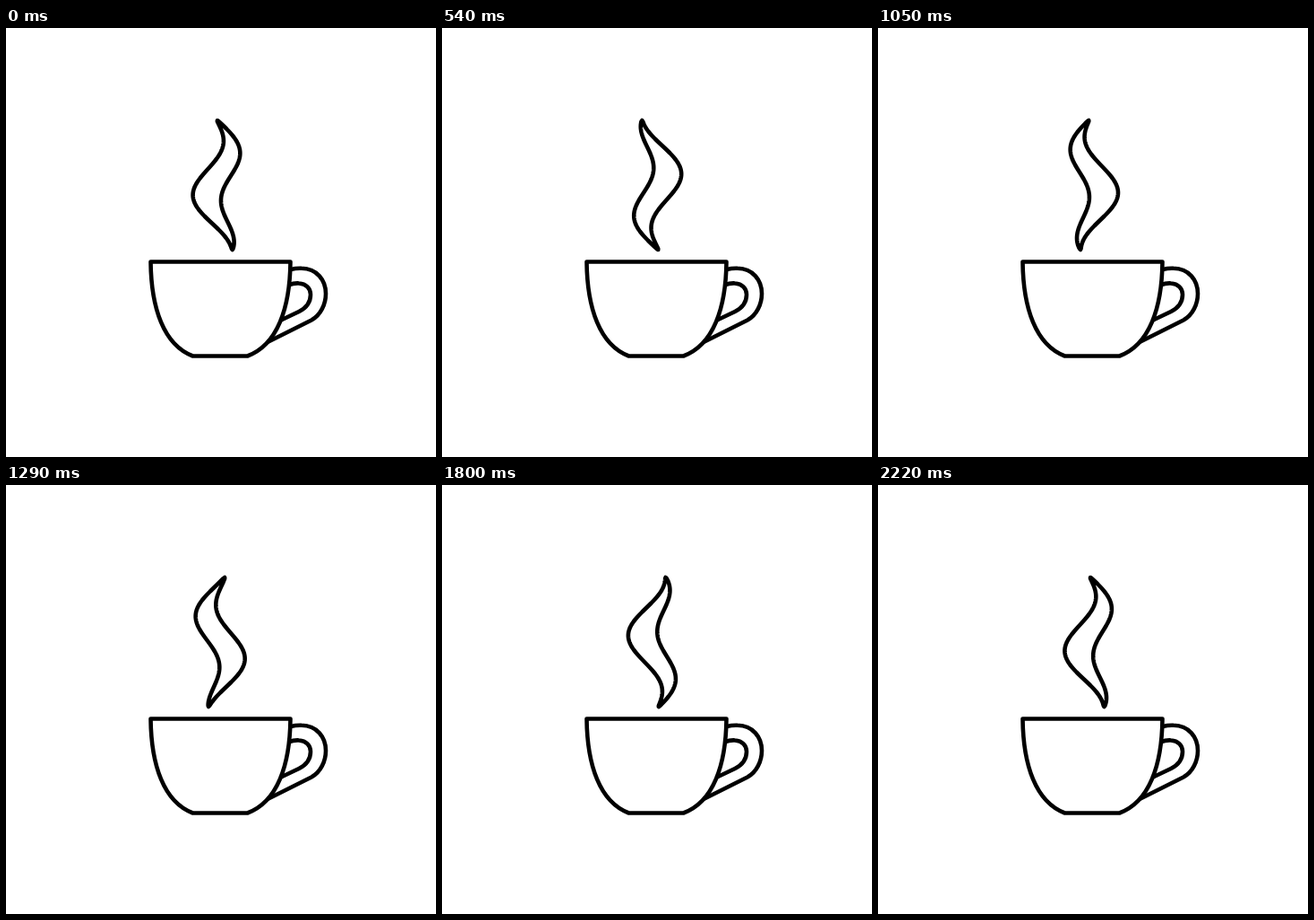
Write an HTML page with a canvas that moves like this. It is 480 px wide and 478 px high and loops after 2250 ms.

```html
<!DOCTYPE html>
<html lang="en">
<head>
<meta charset="utf-8">
<title>Steaming cup</title>
<style>
  html, body { margin: 0; width: 100%; height: 100%; overflow: hidden; background: #fff; }
  canvas { display: block; }
</style>
</head>
<body>
<canvas id="stage" width="480" height="478"></canvas>
<script>
const ctx = document.getElementById('stage').getContext('2d');
const LOOP = 2250, STEP = 30;
const TOP = 103, BOTTOM = 247, MIDDLE = (TOP + BOTTOM) / 2;

const cup = new Path2D(
  'M161.5 260.5 H317.5 C317 312 303 353 269.5 365.5 H208.5 C176 353 162 312 161.5 260.5 Z');
const handle = new Path2D(
  'M318 269 Q324 267.5 330 267.8 C347 268 357 281 357 296 C357 308 351 320 341 325.5 L293 349.5 ' +
  'M315 286.5 Q322 284 327 284.5 C335 285 340 290 340 297 C340 305 335 312 327 316 L307 325.5');

// A sine wave on a slightly tilted axis, travelling down one wavelength per loop.
function centre(y, progress) {
  const axis = 238 + (y - MIDDLE) / 72;
  return axis + 13.7 * Math.sin(2 * Math.PI * ((y - 104.5) / 112.5 - progress));
}

// Widest in the middle, tapering to rounded tips.
function halfWidth(y) {
  const u = Math.abs(y - MIDDLE) / (BOTTOM - MIDDLE);
  const body = 14.6 * Math.pow(Math.max(0, Math.cos(Math.PI / 2 * u)), 1.4);
  return body + 2 * Math.sqrt(1 - u ** 8);
}

function steam(progress) {
  const path = new Path2D();
  for (let y = TOP; y <= BOTTOM; y++) path.lineTo(centre(y, progress) + halfWidth(y), y);
  for (let y = BOTTOM; y >= TOP; y--) path.lineTo(centre(y, progress) - halfWidth(y), y);
  path.closePath();
  return path;
}

function draw(time) {
  const progress = Math.floor((time % LOOP) / STEP) * STEP / LOOP;
  ctx.fillStyle = '#fff';
  ctx.fillRect(0, 0, 480, 478);
  ctx.strokeStyle = '#000';
  ctx.lineWidth = 4.6;
  ctx.lineJoin = ctx.lineCap = 'round';
  ctx.stroke(handle);
  ctx.fill(cup);
  ctx.stroke(cup);
  ctx.stroke(steam(progress));
}

const start = performance.now();
function tick() {
  draw(performance.now() - start);
  requestAnimationFrame(tick);
}
tick();
</script>
</body>
</html>
```
